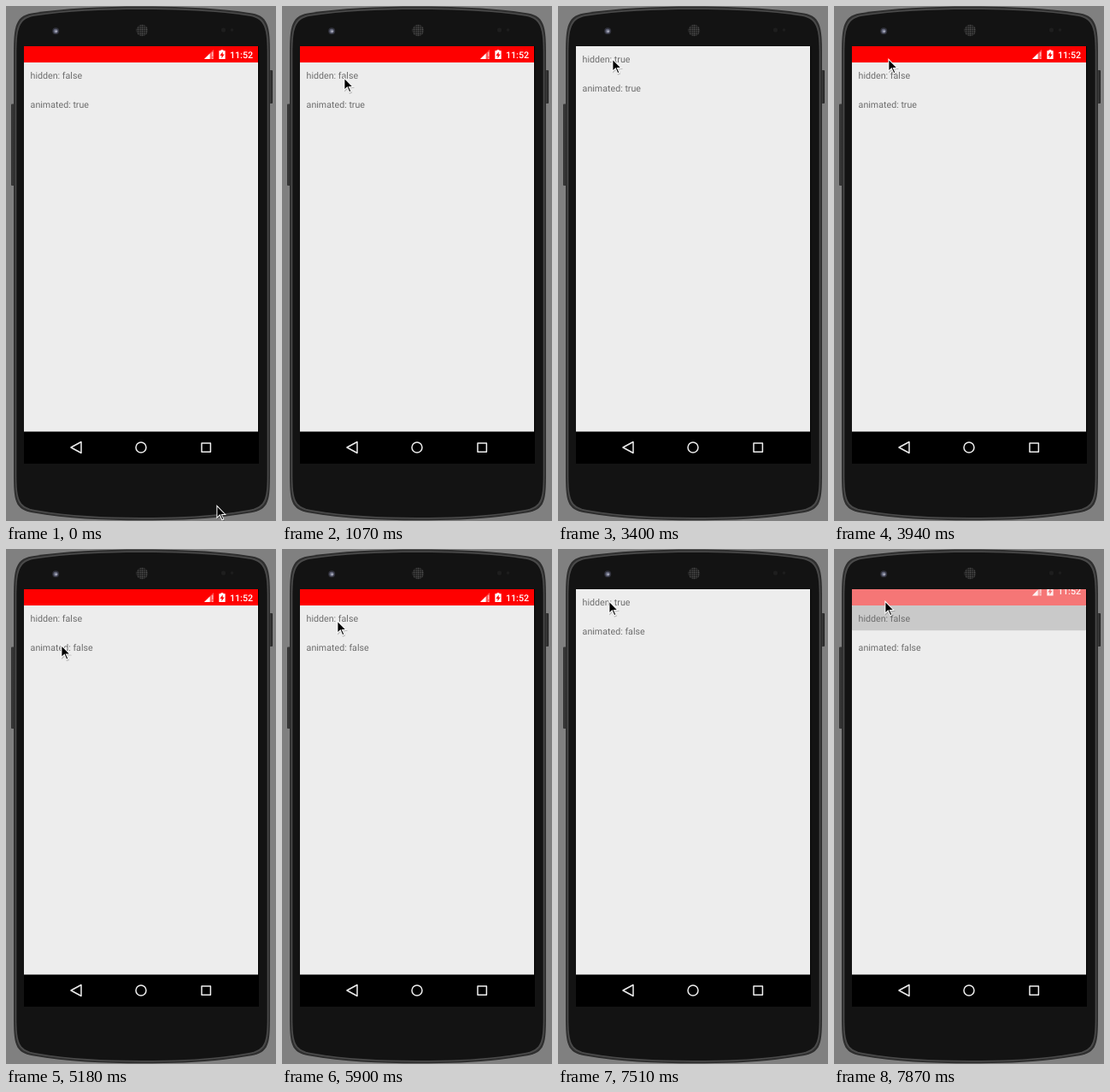
An HTML page that plays this animation: 316x602 px, repeating every 8 s.

```html
<!DOCTYPE html>
<html lang="en">
<head>
<meta charset="utf-8">
<title>Status bar toggle</title>
<style>
html, body { margin: 0; width: 100%; height: 100%; overflow: hidden; background: #808080; }
svg { display: block; width: 100%; height: 100%; }
text { font: 10.66px Roboto, sans-serif; text-rendering: geometricPrecision; }
.label { fill: #6d6d6d; }
.clock { font-weight: 500; fill: #fff; }
</style>
</head>
<body>
<svg viewBox="0 0 316 602">
  <defs>
    <path id="shell" d="M9 62C9 28 9 12 30 8.5C70 2.5 110 .6 159 .6S248 2.5 288 8.5C309 12 309 28 309 62V545C309 578 308 588.5 287 592.3C245 599.5 205 601.3 159 601.3S73 599.5 31 592.3C10 588.5 9 578 9 545Z"/>
    <clipPath id="screen"><rect x="21" y="47" width="274" height="451"/></clipPath>
    <pattern id="mesh" width="2.4" height="2.4" patternUnits="userSpaceOnUse">
      <rect width="2.4" height="2.4" fill="#191919"/>
      <circle cx="1.2" cy="1.2" r=".75" fill="#5c5c5c"/>
    </pattern>
    <linearGradient id="key"><stop stop-color="#2c2c2c"/><stop offset=".5" stop-color="#3c3c3c"/><stop offset="1" stop-color="#161616"/></linearGradient>
  </defs>

  <rect width="316" height="602" fill="#808080"/>
  <rect x="6" y="114.5" width="4" height="95.5" rx="1" fill="url(#key)"/>
  <rect x="308" y="75" width="4" height="39" rx="1" fill="url(#key)"/>
  <use href="#shell" fill="#2e2e2e"/>
  <use href="#shell" fill="#4a4a4a" transform="translate(159 301) scale(.988 .994) translate(-159 -301)"/>
  <use href="#shell" fill="#131313" transform="translate(159 301) scale(.978 .989) translate(-159 -301)"/>

  <circle cx="58.2" cy="29.3" r="4" fill="#30313a"/>
  <circle cx="58.2" cy="29.3" r="2.6" fill="#62657a"/>
  <circle cx="58.6" cy="29.6" r="1.2" fill="#b4b6c4"/>
  <circle cx="159.3" cy="28.5" r="6.8" fill="url(#mesh)"/>
  <circle cx="254.5" cy="28" r="2.6" fill="#1e1e1e"/>
  <circle cx="264.5" cy="28" r="1.8" fill="#1e1e1e"/>

  <rect x="21" y="47" width="275" height="488" fill="#000"/>
  <g fill="none" stroke="#eee" stroke-width="1.5" stroke-linejoin="round">
    <path d="M76 516L88 509.5V522.5Z"/>
    <circle cx="158" cy="516" r="6"/>
    <rect x="229" y="510.9" width="10.4" height="10.4"/>
  </g>

  <g clip-path="url(#screen)">
    <rect x="21" y="47" width="274" height="450.5" fill="#ededed"/>
    <g id="content">
      <rect id="press" x="21" y="66" width="274" height="29.3" rx="1.5" fill="#c9c9c9"/>
      <text id="hiddenText" class="label" x="28.6" y="85"></text>
      <text id="animText" class="label" x="28.6" y="119"></text>
    </g>
    <rect id="bar" x="21" y="47" width="274" height="19" fill="#fe0000"/>
    <g id="icons" fill="#fff">
      <path d="M232 62H243V51Z" opacity=".35"/>
      <path d="M232 62H238.6V55.4Z"/>
      <path d="M241 54H242.4V59H241ZM241 60.4H242.4V62H241Z" opacity=".5"/>
      <path fill-rule="evenodd" d="M249.3 52.3H251.4V51.2H254.4V52.3H256.6V62H249.3ZM253.6 53.4L250.4 58H252.4V61L255.6 56.4H253.6Z"/>
      <text class="clock" x="262" y="61">11:52</text>
    </g>
  </g>

  <g id="cursor">
    <g transform="translate(-.6 -.9)">
      <path d="M.6 1.4V17.4L4 14.4L6.6 19.6L9.8 18.4L7.6 13H12.6Z" fill="#000" opacity=".2"/>
      <path d="M0 0V16.2L3.7 12.9L6.2 18.5L9.1 17.2L6.7 11.9H11.6Z" fill="#fff"/>
      <path d="M1 2.4V13.8L4.1 11L6.7 17L7.8 16.5L5.2 10.9H9.4Z" fill="#000"/>
    </g>
  </g>
</svg>
<script>
const LOOP = 8000;
const el = id => document.getElementById(id);

// Pointer moves: first step, last step, step count, end point.
const start = [247, 584];
const moves = [
  [180, 1070, 6, 73, 84],
  [2150, 2150, 1, 67, 83],
  [3050, 3400, 3, 64, 62],
  [4110, 4460, 3, 65, 112.5],
  [5540, 5900, 3, 65, 84],
  [6440, 6440, 1, 66, 82],
  [7330, 7510, 2, 60, 61]
];

const shown = { hidden: false, alpha: 1, lift: 0, icons: 1, press: 0 };
const gone = { hidden: true, alpha: 0, lift: 0, icons: 0, press: 0 };
const entering = { hidden: false, alpha: .5, lift: -7.6, icons: .9, press: 1 };
const states = [
  [0, shown],
  [2510, { ...gone, alpha: .86, icons: 1, press: 1 }],
  [2690, gone],
  [3760, entering],
  [3940, shown],
  [6800, { ...gone, alpha: .71, icons: 1 }],
  [6970, gone],
  [7870, entering]
];

const ease = p => p * p * (3 - 2 * p);

function pointerAt(t) {
  let [x, y] = start;
  for (const [t0, t1, n, endX, endY] of moves) {
    if (t < t0) break;
    const gap = n > 1 ? (t1 - t0) / (n - 1) : 1;
    const step = Math.min(n, Math.floor((t - t0) / gap + .01) + 1);
    const p = ease(step / n);
    x += (endX - x) * p;
    y += (endY - y) * p;
  }
  return [x, y];
}

function draw(t) {
  const s = states.filter(([at]) => at <= t).pop()[1];
  const [x, y] = pointerAt(t);
  el("hiddenText").textContent = "hidden: " + s.hidden;
  el("animText").textContent = "animated: " + (t < 5180);
  el("content").setAttribute("transform", `translate(0 ${s.hidden ? -19 : 0})`);
  el("press").setAttribute("opacity", s.press);
  el("bar").setAttribute("opacity", s.alpha);
  el("icons").setAttribute("opacity", s.icons);
  el("icons").setAttribute("transform", `translate(0 ${s.lift})`);
  el("cursor").setAttribute("transform", `translate(${x} ${y})`);
}

const began = performance.now();
function tick() {
  draw((performance.now() - began) % LOOP);
  requestAnimationFrame(tick);
}
tick();
</script>
</body>
</html>
```
